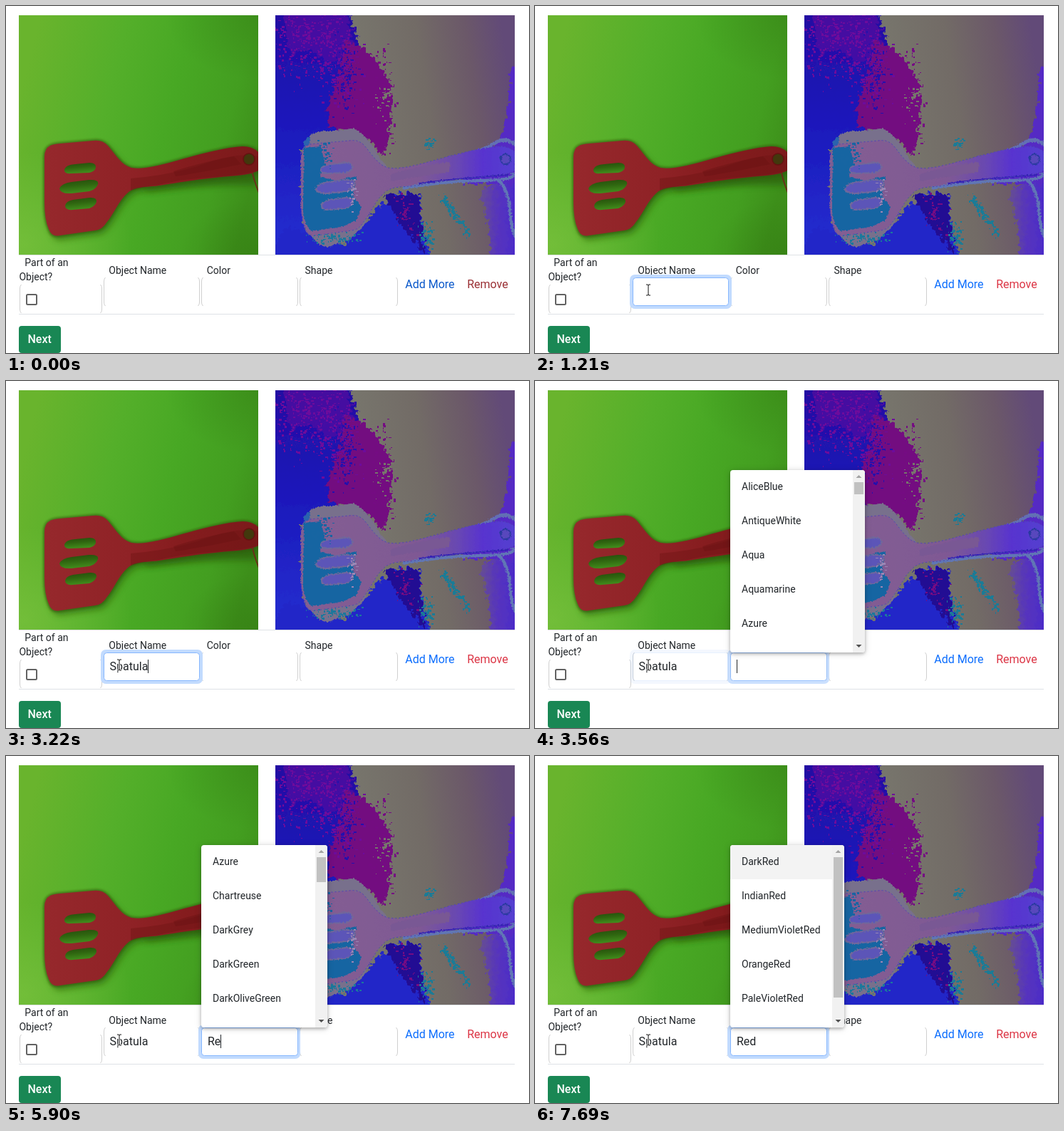
These frames come from a looping animation (734 by 487 pixels, 8 s). An HTML page:

```html
<!DOCTYPE html>
<html lang="en">
<head>
<meta charset="utf-8">
<title>Object labelling form</title>
<style>
html, body { margin: 0; width: 100%; height: 100%; overflow: hidden; background: #fff; }
svg { display: block; width: 734px; height: 487px; }
text { font: 14px Roboto, sans-serif; fill: #212529; white-space: pre; }
.big { font-size: 16px; }
.line { fill: none; stroke: #d0d0d0; }
.shadow { filter: drop-shadow(0 2px 2px rgba(0,0,0,.22)) drop-shadow(0 1px 4px rgba(0,0,0,.18)); }
</style>
</head>
<body>
<svg viewBox="0 0 734 487">
  <defs>
    <linearGradient id="green" x1="0" y1=".35" x2="1" y2=".6">
      <stop offset="0" stop-color="#69b42d"/><stop offset=".35" stop-color="#54af2a"/>
      <stop offset=".6" stop-color="#48a824"/><stop offset=".85" stop-color="#439e20"/>
      <stop offset="1" stop-color="#3d8f1a"/>
    </linearGradient>
    <radialGradient id="glow"><stop offset="0" stop-color="#7cc440"/><stop offset="1" stop-color="#7cc440" stop-opacity="0"/></radialGradient>
    <radialGradient id="dim"><stop offset="0" stop-color="#2c6a0c"/><stop offset="1" stop-color="#2c6a0c" stop-opacity="0"/></radialGradient>
    <linearGradient id="slot" x1="0" y1="0" x2=".25" y2="1">
      <stop offset="0" stop-color="#254a0b"/><stop offset=".5" stop-color="#2f6610"/><stop offset="1" stop-color="#418c1c"/>
    </linearGradient>
    <linearGradient id="red" gradientUnits="userSpaceOnUse" x1="55" y1="0" x2="354" y2="0">
      <stop offset="0" stop-color="#96282c"/><stop offset=".4" stop-color="#8f2226"/>
      <stop offset=".65" stop-color="#851c1e"/><stop offset="1" stop-color="#7c1a1b"/>
    </linearGradient>
    <linearGradient id="gray" x1="0" y1=".55" x2="1" y2=".4">
      <stop offset=".4" stop-color="#77756c"/><stop offset=".65" stop-color="#726b66"/>
      <stop offset=".85" stop-color="#6b5869"/><stop offset="1" stop-color="#624a78"/>
    </linearGradient>
    <linearGradient id="blue" x1="0" y1="0" x2="0" y2="1">
      <stop offset="0" stop-color="#250ba0"/><stop offset=".45" stop-color="#1b18bb"/><stop offset="1" stop-color="#2630d2"/>
    </linearGradient>
    <linearGradient id="violet" x1="0" y1="0" x2="1" y2="0">
      <stop offset="0" stop-color="#68508f"/><stop offset=".4" stop-color="#5634bd"/><stop offset="1" stop-color="#4526cf"/>
    </linearGradient>
    <linearGradient id="mauve" gradientUnits="userSpaceOnUse" x1="55" y1="0" x2="354" y2="0">
      <stop offset="0" stop-color="#845e92"/><stop offset=".55" stop-color="#7f5994"/>
      <stop offset=".72" stop-color="#6a49b0"/><stop offset=".85" stop-color="#5833cf"/><stop offset="1" stop-color="#5440d0"/>
    </linearGradient>
    <filter id="soft" x="-30%" y="-30%" width="160%" height="160%"><feGaussianBlur stdDeviation="5"/></filter>
    <filter id="tight" x="-10%" y="-10%" width="120%" height="120%"><feGaussianBlur stdDeviation="1.5"/></filter>
    <filter id="rough" x="-5%" y="-5%" width="110%" height="110%">
      <feTurbulence type="fractalNoise" baseFrequency=".16" numOctaves="2" seed="4"/>
      <feDisplacementMap in="SourceGraphic" scale="15" xChannelSelector="R" yChannelSelector="G"/>
    </filter>
    <filter id="grain" x="-5%" y="-5%" width="110%" height="110%">
      <feTurbulence type="fractalNoise" baseFrequency=".4" seed="8"/>
      <feDisplacementMap in="SourceGraphic" scale="5" xChannelSelector="R" yChannelSelector="G"/>
    </filter>
    <path id="tool" d="M62 196Q66 194 76 193L122 189Q135 187 143 196C155 210 162 223 176 227C192 230 215 224 250 214C280 206 310 198 332 197Q346 197 354 205V231Q346 236 325 238C285 241 245 247 215 252C195 255 182 252 171 262C158 273 152 291 141 304Q135 314 125 315L76 322Q64 325 60 313Q54 300 54 275V212Q54 200 62 196Z"/>
    <g id="slots">
      <path d="M82 229Q84 223 97 222L117 220Q127 220 126 227Q125 232 117 234L91 235Q81 236 82 229Z"/>
      <path d="M75 256Q78 249 92 247L116 244Q131 243 129 250Q127 257 117 260L92 263Q76 264 75 256Z"/>
      <path d="M83 280Q84 274 94 272L117 269Q128 268 127 275Q125 281 117 284L94 286Q83 287 83 280Z"/>
    </g>
    <clipPath id="photoL"><rect x="18" y="13" width="336" height="336"/></clipPath>
    <clipPath id="photoR"><rect x="378" y="13" width="336" height="336"/></clipPath>
    <clipPath id="panelClip"><rect id="clipBox" x="274" y="125" width="189" height="256" rx="4"/></clipPath>
  </defs>

  <rect width="734" height="487" fill="#fff"/>
  <path d="M18 349.5H714M18 432.5H714" stroke="#dee2e6"/>

  <g clip-path="url(#photoL)">
    <rect x="18" y="13" width="336" height="336" fill="url(#green)"/>
    <ellipse cx="25" cy="335" rx="150" ry="130" fill="url(#glow)" opacity=".65"/>
    <ellipse cx="354" cy="349" rx="110" ry="80" fill="url(#dim)" opacity=".3"/>
    <ellipse cx="354" cy="13" rx="130" ry="90" fill="url(#dim)" opacity=".3"/>
    <use href="#tool" x="4" y="6" fill="#2f6a10" opacity=".75" filter="url(#soft)"/>
    <path d="M190 252Q270 238 354 230V252Q270 250 200 260Z" fill="#2b5c0e" opacity=".6" filter="url(#soft)"/>
    <use href="#tool" fill="#34560f" stroke="#34560f" stroke-width="4" opacity=".6" filter="url(#tight)"/>
    <path d="M345 231Q349 248 355 262" fill="none" stroke="#69301a" stroke-width="2"/>
    <use href="#tool" fill="url(#red)"/>
    <path d="M175 242Q235 237 280 221T354 211V231Q335 237 290 240T215 251Q190 254 175 259Z" fill="#701414" opacity=".45"/>
    <path d="M235 232Q280 218 320 211L330 222Q285 232 238 239Z" fill="#681212" opacity=".4"/>
    <use href="#slots" fill="url(#slot)"/>
    <circle cx="341" cy="215" r="8" fill="#42380d" stroke="#641211" stroke-width="1.5"/>
  </g>

  <g clip-path="url(#photoR)">
    <rect x="378" y="13" width="336" height="336" fill="url(#gray)"/>
    <g filter="url(#rough)">
      <path d="M360 0H478L500 62L480 95L456 150L475 190L415 200V300L445 360H360Z" fill="url(#blue)"/>
      <path d="M385 0H476L490 60L455 82L425 62L400 70Z" fill="#6d0b9c" opacity=".45"/>
      <path d="M476 48Q508 58 526 85Q545 112 541 140L537 185L528 209L505 184Q480 174 452 170Q447 138 464 105Z" fill="#730b80"/>
      <path d="M395 310L475 336L520 285L545 263H580L586 320L600 360H360Z" fill="#2426c8"/>
      <path d="M530 266L579 263L584 318L589 350L552 304Z" fill="#210b93"/>
      <path d="M664 262L692 246L730 230V365H680Q680 300 664 262Z" fill="url(#violet)"/>
      <path d="M708 90L730 60V250H640L636 213Q665 206 690 190Q704 170 708 90Z" fill="#5429c4"/>
    </g>
    <g id="specks"></g>
    <g filter="url(#grain)">
      <path d="M640 209Q668 204 685 193T716 196" fill="none" stroke="#6270b4" stroke-width="5"/>
      <g transform="translate(360 0)">
        <path d="M66 182Q75 174 100 175L128 172Q149 182 164 213L174 224L171 259Q152 284 142 309L121 328L90 339Q70 332 64 312Z" fill="#78708c"/>
        <path d="M58 190L66 182L70 316Q57 312 55 290Z" fill="#2a64ae"/>
        <use href="#tool" fill="url(#mauve)"/>
        <path d="M180 236Q225 223 263 219L262 233Q215 240 180 246Z" fill="#795894"/>
        <path d="M58 199L82 197L87 219L80 240L103 245L132 239L127 267L139 282L131 301L111 310L69 316Q56 304 57 280Z" fill="#1765a2"/>
        <use href="#slots" fill="#5b55b8" stroke="#6f689c" stroke-width="2"/>
        <path d="M197 256Q250 246 306 245T350 234M330 244Q344 253 347 285T356 325" fill="none" stroke="#6176b5" stroke-width="4"/>
        <path d="M220 249Q281 241 345 237" fill="none" stroke="#3420b4" stroke-width="2"/>
        <circle cx="341" cy="215" r="7" fill="#5947bd" stroke="#293a9f" stroke-width="2"/>
      </g>
    </g>
    <use href="#tool" x="360" fill="none" stroke="#4c46b6" stroke-dasharray="2 3"/>
    <g id="topSpecks"></g>
  </g>

  <path id="sides" class="line"/>
  <text x="26.3" y="365">Part of an</text>
  <text x="18.4" y="385">Object?</text>
  <text x="144.3" y="376">Object Name</text>
  <text x="281.7" y="376">Color</text>
  <text x="419.5" y="376">Shape</text>
  <rect x="29" y="405" width="14" height="14" rx="1.5" fill="#fff" stroke="#626262" stroke-width="2"/>
  <text id="add" class="big" x="560.3" y="396">Add More</text>
  <text id="remove" class="big" x="647.2" y="396">Remove</text>
  <rect x="18" y="449" width="59" height="38" rx="4" fill="#198754"/>
  <text class="big" x="30.5" y="473" style="fill:#fff;font-weight:500">Next</text>

  <g id="ringName">
    <rect x="133" y="377" width="143" height="48" rx="7" fill="#c2dbfe"/>
    <rect x="137.5" y="381.5" width="134" height="39" rx="4" fill="#fff" stroke="#86b7fe"/>
  </g>
  <g id="ringColor">
    <rect x="270" y="377" width="143" height="48" rx="7" fill="#c2dbfe"/>
    <rect x="274.5" y="381.5" width="135" height="39" rx="4" fill="#fff" stroke="#86b7fe"/>
  </g>
  <text id="name" class="big" x="145.6" y="406"></text>
  <text id="color" class="big" x="283" y="406"></text>
  <rect id="caret" y="391" width="1" height="19" fill="#212529"/>

  <g id="panel">
    <rect id="panelBox" class="shadow" x="274" y="125" width="189" height="256" rx="4" fill="#fff"/>
    <g clip-path="url(#panelClip)">
      <rect id="active" x="274" y="125" width="143" height="48" fill="#f3f3f3"/>
      <g id="options"></g>
      <g id="bar">
        <rect x="-17" y="125" width="17" height="256" fill="#f1f1f1"/>
        <rect id="thumb" x="-15" y="142" width="13" fill="#c1c1c1"/>
        <path d="M-12.5 136L-8.5 132L-4.5 136Z" fill="#a3a3a3"/>
        <path d="M-12.5 370L-8.5 374L-4.5 370Z" fill="#505050"/>
      </g>
    </g>
  </g>

  <g id="beam" fill="none">
    <path d="M-3 -7.5H-1Q0 -7.5 0 -6Q0 -7.5 1 -7.5H3M0 -6V6M-3 7.5H-1Q0 7.5 0 6Q0 7.5 1 7.5H3" stroke="#fff" stroke-width="3"/>
    <path d="M-3 -7.5H-1Q0 -7.5 0 -6Q0 -7.5 1 -7.5H3M0 -6V6M-3 7.5H-1Q0 7.5 0 6Q0 7.5 1 7.5H3" stroke="#111"/>
  </g>
  <path id="arrow" d="M0 0V16L4 12.5L6.5 18L9 17L6.5 11.5H11.5Z" fill="#fff" stroke="#111"/>
</svg>
<script>
const LOOP = 8000;
const $ = id => document.getElementById(id);
const set = (id, attrs) => { for (const k in attrs) $(id).setAttribute(k, attrs[k]); };
const show = (id, on) => set(id, { visibility: on ? 'visible' : 'hidden' });
const ramp = (t, a, b) => Math.min(1, Math.max(0, (t - a) / (b - a)));
const latest = (steps, t) => steps.filter(s => t >= s[0]).pop();

// Outlined fields show only their left and right sides.
const side = (x, y, dir) => `M${x + 2 * dir} ${y}Q${x} ${y + 2} ${x} ${y + 5}V${y + 35}Q${x} ${y + 38} ${x + 2 * dir} ${y + 40}`;
const fields = [[19.5, 134.5, 391], [137.5, 271.5, 381], [274.5, 409.5, 381], [412.5, 549.5, 381]];
set('sides', { d: fields.map(([l, r, y]) => side(l, y, 1) + side(r, y, -1)).join('') });

// Speckle clouds: colour, count, centre, spread, slope.
let seed = 7;
const rnd = () => (seed = seed * 16807 % 2147483647) / 2147483647;
const spread = () => rnd() + rnd() - 1;
function cloud([fill, n, cx, cy, sx, sy, slope = 0]) {
  let d = '';
  for (let i = 0; i < n; i++) {
    const dx = spread() * sx, dy = spread() * sy + dx * slope;
    const w = 1 + Math.floor(rnd() * 4), h = 1 + Math.floor(rnd() * 3);
    d += `M${Math.round(cx + dx)} ${Math.round(cy + dy)}h${w}v${h}h${-w}z`;
  }
  return `<path fill="${fill}" d="${d}"/>`;
}
$('specks').innerHTML = [
  ['#6d0b9c', 420, 420, 40, 75, 80],
  ['#6d0b9c', 160, 470, 85, 35, 60],
  ['#2410ac', 150, 474, 95, 25, 65],
  ['#750b83', 150, 528, 130, 22, 85],
  ['#77756c', 50, 530, 120, 18, 70],
  ['#1b7b96', 110, 629, 293, 26, 12, 1.4],
  ['#1b7b96', 60, 589, 322, 12, 28],
  ['#1b7b96', 30, 594, 194, 9, 12],
  ['#750b83', 45, 560, 290, 22, 28, .8]
].map(cloud).join('');
$('topSpecks').innerHTML = [
  ['#1b789c', 70, 462, 325, 45, 10],
  ['#1765a2', 70, 438, 210, 24, 25],
  ['#9a86b4', 30, 485, 265, 9, 26]
].map(cloud).join('');

const pointer = [[70, 274.5, 421.5], [140, 230, 410], [200, 172, 399], [270, 141, 392], [400, 159, 398.5]];

const nameTyping = [[0, 0], [2020, 1], [2290, 2], [2420, 3], [2690, 4], [2890, 5], [3160, 6], [3220, 7]];
const colorTyping = [[0, 0], [5700, 1], [5900, 2], [6100, 3]];
const caretOff = [[0, 670], [1210, 1740], [4100, 4630], [5160, 5700], [6630, 7160], [7690, LOOP]];

// Time, panel width, thumb height, visible options.
const menus = [
  [3560, 189, 17, 'AliceBlue AntiqueWhite Aqua Aquamarine Azure'],
  [5700, 189, 17, 'Aquamarine Azure Brown BurlyWood Chartreuse'],
  [5900, 177, 35, 'Azure Chartreuse DarkGrey DarkGreen DarkOliveGreen'],
  [6100, 160, 197, 'DarkRed IndianRed MediumVioletRed OrangeRed PaleVioletRed']
];
let menuShown = null;

function drawMenu(menu) {
  if (menu === menuShown) return;
  menuShown = menu;
  show('panel', !!menu);
  if (!menu) return;
  const [, width, height, words] = menu;
  set('panelBox', { width });
  set('clipBox', { width });
  set('bar', { transform: `translate(${274 + width} 0)` });
  set('thumb', { height });
  $('options').innerHTML = words.split(' ').map((w, i) => `<text x="290" y="${153 + 48 * i}">${w}</text>`).join('');
}

function draw(t) {
  const at = latest(pointer, t);
  const inside = t >= 140;
  show('arrow', at && !inside);
  show('beam', at && inside);
  if (at) for (const id of ['arrow', 'beam']) set(id, { transform: `translate(${at[1]} ${at[2]})` });

  const late = t >= 670;
  $('add').style.fill = late ? '#0d6efd' : '#0a58ca';
  $('remove').style.fill = late ? '#dc3545' : '#9a3034';

  const onColor = t >= 3560;
  set('ringName', { opacity: onColor ? 1 - ramp(t, 3440, 3590) : late ? ramp(t, 600, 740) : 0 });
  set('ringColor', { opacity: onColor ? ramp(t, 3200, 3630) : 0 });

  const name = 'Spatula'.slice(0, latest(nameTyping, t)[1]);
  const color = 'Red'.slice(0, latest(colorTyping, t)[1]);
  $('name').textContent = name;
  $('color').textContent = color;
  const box = $(onColor ? 'color' : 'name');
  const typed = (onColor ? color : name) ? box.getComputedTextLength() : 0;
  const start = onColor ? 283 : 145.6;
  set('caret', { x: typed ? Math.floor(start + typed) : Math.round(start) });
  show('caret', !caretOff.some(([a, b]) => t >= a && t < b));

  drawMenu(latest(menus, t));
  set('active', { opacity: t >= 7560 ? 1 : 0 });
}

show('panel', false);
const begin = performance.now();
function tick() {
  draw((performance.now() - begin) % LOOP);
  requestAnimationFrame(tick);
}
tick();
</script>
</body>
</html>
```
